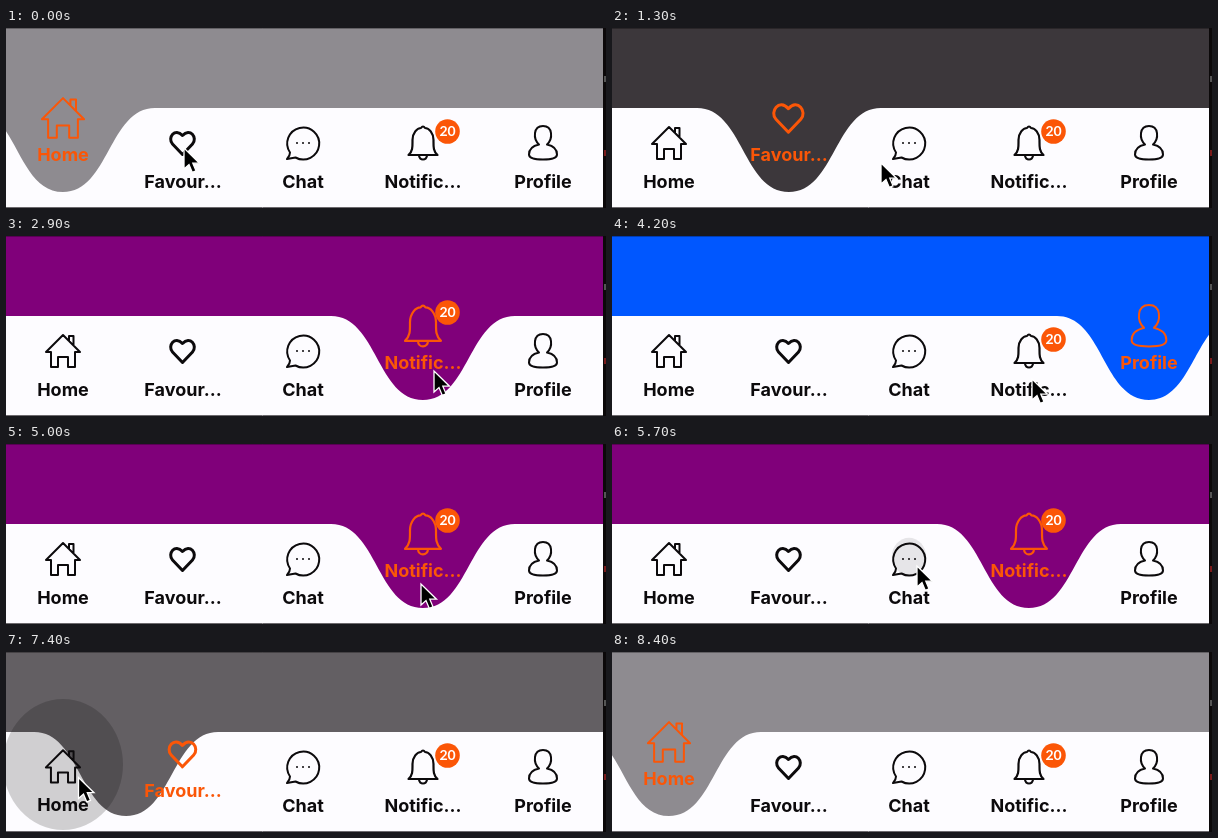
Recreate the animation shown at these times as an HTML page. Size 600 by 180 pixels, loop 8600 ms.

```html
<!DOCTYPE html>
<html lang="en">
<head>
<meta charset="utf-8">
<style>
  html, body { margin: 0; width: 100%; height: 100%; overflow: hidden; }
  svg { display: block; }
  .icon { fill: none; stroke-linejoin: round; stroke-linecap: round; }
  .icon path { vector-effect: non-scaling-stroke; }
  .label { font: 700 18px Inter, sans-serif; text-anchor: middle; }
  .badge { font: 700 14px Lato, sans-serif; text-anchor: middle; fill: #fff; }
</style>
</head>
<body>
<svg id="stage" width="600" height="180" viewBox="0 0 600 180">
  <rect id="back" width="600" height="180"/>
  <path id="bar" fill="#fdfcff"/>
  <ellipse id="ripple"/>
  <g id="tabs"></g>
  <path d="M0 .5H597" stroke="#000" stroke-opacity=".3"/>
  <path d="M0 179.5H597" stroke="#6c696d"/>
  <rect x="597" width="3" height="180" fill="#0b0809"/>
  <path d="M599 48v6" stroke="#555" stroke-width="2"/>
  <path d="M599 122v6" stroke="#7a1a1a" stroke-width="2"/>
  <path id="cursor" d="M0 0V21L5 16.6 8.3 24.4 12 22.8 8.8 15.2H15.5Z" fill="#000" stroke="#fff" stroke-width="1.3"/>
</svg>
<script>
const LOOP = 8600, STEP = 100, MOVE_DELAY = 100, MOVE_TIME = 500;
const ORANGE = '#fb5607', BLACK = '#0c0a0c';

const tabs = [
  { name: 'Home', x: 57, color: [142, 139, 144], width: 2,
    icon: 'M-17 1L0-16 17 1H12V16H5V6H-5V16H-12V1ZM6-10V-15H10.500V-5.500' },
  { name: 'Favour...', x: 177, color: [60, 55, 59], width: 3,
    icon: 'M-.5 11.500L-10.500 1C-16-5-8-16-.5-7.500C7-16 15-5 9.500 1Z' },
  { name: 'Chat', x: 297, color: [76, 175, 80], width: 2,
    icon: 'M-13 9.500A16 16 0 1 1-7.500 14.500L-16 16Q-13 13-13 9.500ZM-6 0h.01M0 0h.01M6 0h.01' },
  { name: 'Notific...', x: 417, color: [128, 0, 122], width: 2.2,
    icon: 'M-14.500 12C-10 8-10.500 3-10.500-3C-10.500-10-6-15-2-15Q0-18 2-15C6-15 10.500-10 10.500-3C10.500 3 10 8 14.500 12ZM-4 12C-4 18 4 18 4 12' },
  { name: 'Profile', x: 537, color: [0, 87, 255], width: 2,
    icon: 'M-4 1.500C-10-4-10-17 0-17S10-4 4 1.500C11 3 14 7 14 11.500Q14 16.500 0 16.500T-14 11.500C-14 7-11 3-4 1.500' }
];

// Click time, chosen tab, optional colour passed on the way.
const clicks = [
  [600, 1], [1500, 2], [2250, 3], [3450, 4], [4350, 3],
  [5650, 2], [6250, 1, [140, 135, 138]], [7150, 0]
];

// Pointer tip: time, x, y.
const pointer = [
  [0, 178, 120], [800, 178, 120], [1300, 269, 135], [1500, 300, 138], [1900, 300, 138],
  [2250, 420, 137], [2900, 428, 135], [3300, 506, 140], [3500, 525, 145], [3900, 525, 145],
  [4200, 420, 143], [5000, 415, 140], [5600, 305, 122], [5900, 305, 122], [6250, 214, 122],
  [6650, 214, 122], [7100, 80, 124], [7500, 70, 126], [7900, 60, 190]
];

const $ = id => document.getElementById(id);
const clamp = v => Math.max(0, Math.min(1, v));
const mix = (a, b, p) => a + (b - a) * p;
const mixColor = (a, b, p) => a.map((v, i) => mix(v, b[i], p));
const set = (node, attrs) => {
  for (const key in attrs) node.setAttribute(key, attrs[key]);
};

$('tabs').innerHTML = tabs.map(tab => `<g>
  <g class="icon" stroke-width="${tab.width}"><path d="${tab.icon}"/></g>
  <text class="label" x="${tab.x}">${tab.name}</text>
</g>`).join('') + `<g id="badge">
  <circle cx="441.500" cy="103.500" r="12.300" fill="${ORANGE}"/>
  <text class="badge" x="441.500" y="108">20</text>
</g>`;
tabs.forEach((tab, i) => {
  const group = $('tabs').children[i];
  tab.iconNode = group.querySelector('.icon');
  tab.labelNode = group.querySelector('.label');
});

function drawTab(tab, lift) {
  const color = lift > .5 ? ORANGE : BLACK;
  set(tab.iconNode, {
    stroke: color,
    transform: `translate(${tab.x} ${115 - 25 * lift}) scale(${1 + .24 * lift})`
  });
  set(tab.labelNode, { y: 159.5 - 27 * lift, fill: color });
}

function drawPointer(t) {
  const next = pointer.findIndex(key => key[0] > t);
  const b = next < 0 ? pointer.at(-1) : pointer[next];
  const a = next < 0 ? b : pointer[next - 1];
  const p = a === b ? 1 : (t - a[0]) / (b[0] - a[0]);
  set($('cursor'), { transform: `translate(${mix(a[1], b[1], p)} ${mix(a[2], b[2], p)})` });
}

function draw(t) {
  const last = clicks.findLastIndex(click => click[0] <= t);
  const [time, target, via] = last < 0 ? [-LOOP, 0] : clicks[last];
  const source = last > 0 ? clicks[last - 1][1] : 0;
  const from = tabs[source], to = tabs[target];
  const age = t - time;
  const p = 1 - (1 - clamp((age - MOVE_DELAY) / MOVE_TIME)) ** 1.8;

  const middle = via || mixColor(from.color, to.color, .5);
  const color = mixColor(mixColor(from.color, middle, p), mixColor(middle, to.color, p), p);
  set($('back'), { fill: `rgb(${color.map(Math.round)})` });

  const x = mix(from.x, to.x, p);
  set($('bar'), {
    d: `M-60 80H${x - 92}C${x - 46} 80 ${x - 46} 164 ${x} 164S${x + 46} 80 ${x + 92} 80H660V180H-60Z`
  });

  const lifts = tabs.map(() => 0);
  lifts[source] = 1 - p;
  lifts[target] = source === target ? 1 : p ** 5;
  tabs.forEach((tab, i) => drawTab(tab, lifts[i]));
  set($('badge'), { transform: `translate(0 ${-27 * lifts[3]})` });

  const grow = clamp((age + 30) / 280);
  set($('ripple'), {
    cx: to.x, cy: 112.5, rx: 60 * grow, ry: 65.5 * grow,
    'fill-opacity': .18 * clamp((age + 30) / 160) * clamp((600 - age) / 200)
  });
  drawPointer(t);
}

function tick() {
  draw(Math.floor(performance.now() % LOOP / STEP) * STEP);
  requestAnimationFrame(tick);
}
tick();
</script>
</body>
</html>
```
